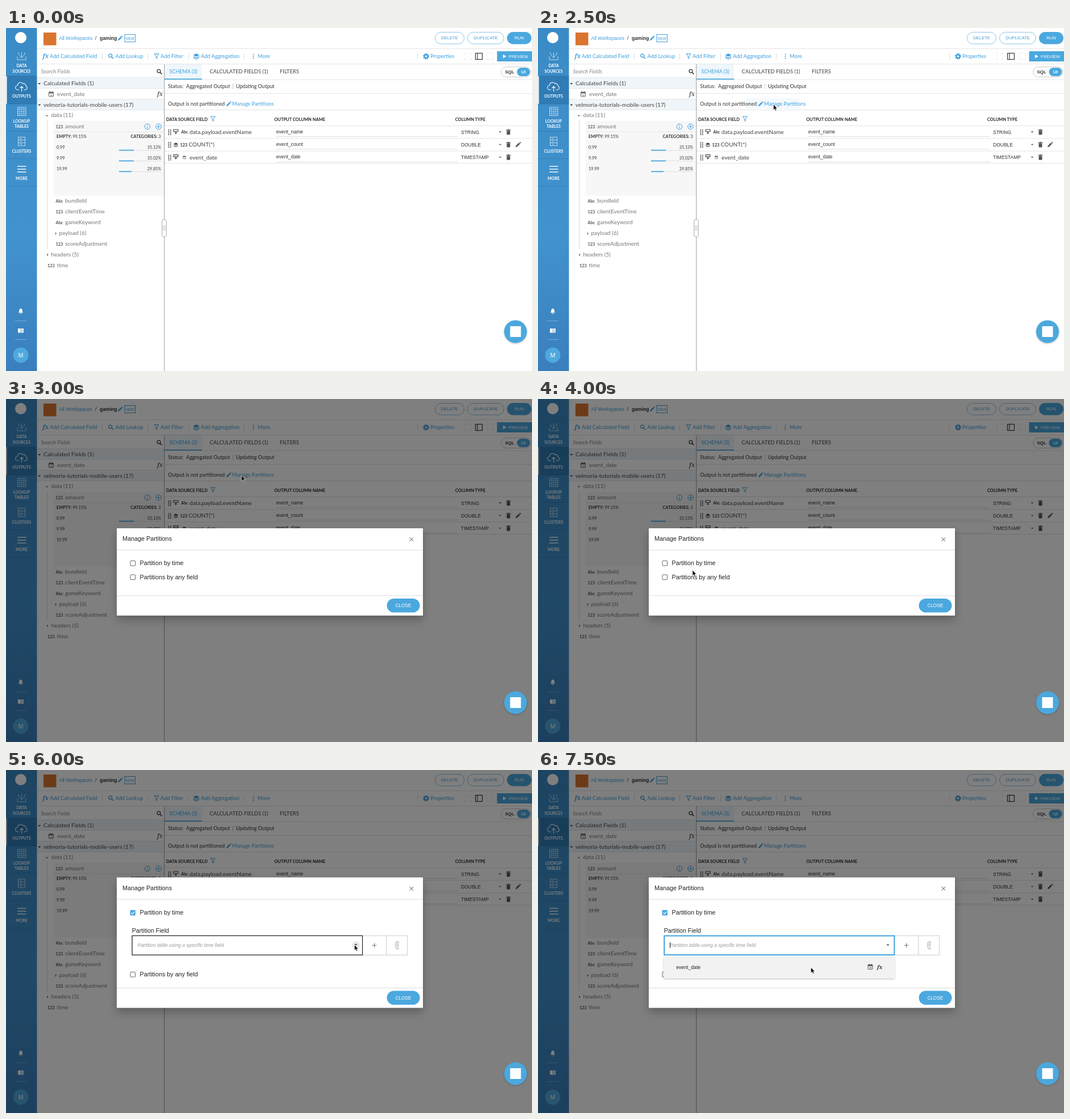
An HTML page for the animation above (8 s loop, 926 by 605 pixels).

```html
<!DOCTYPE html>
<html lang="en">
<head>
<meta charset="utf-8">
<title>Manage partitions</title>
<style>
html, body { margin: 0; width: 100%; height: 100%; overflow: hidden; background: #fff; }
svg { display: block; width: 100vw; height: 100vh; }
text { font-family: Lato, sans-serif; white-space: pre; }
.h { font-family: "Liberation Sans", Arial, sans-serif; }
.b { font-weight: 700; }
.i { font-style: italic; }
.m { text-anchor: middle; }
.e { text-anchor: end; }
.fx { font-family: "Noto Serif", "Liberation Serif", serif; font-style: italic; font-weight: 600; }
</style>
</head>
<body>
<svg id="stage" viewBox="0 0 926 605" xmlns="http://www.w3.org/2000/svg">
  <defs>
    <linearGradient id="navFill" x1="0" y1="0" x2="0" y2="1">
      <stop offset="0" stop-color="#3a8bc5"/>
      <stop offset=".6" stop-color="#4193cf"/>
      <stop offset="1" stop-color="#3a7fbd"/>
    </linearGradient>
    <filter id="modalShadow" x="-10%" y="-30%" width="120%" height="160%">
      <feDropShadow dx="0" dy="8" stdDeviation="8" flood-opacity=".25"/>
    </filter>
    <filter id="softShadow" x="-30%" y="-30%" width="160%" height="160%">
      <feDropShadow dx="0" dy="1" stdDeviation="1.8" flood-opacity=".3"/>
    </filter>
  </defs>
  <g id="page"></g>
  <rect id="dim" width="926" height="605" fill="#000"/>
  <g id="chat"></g>
  <g id="modal"></g>
  <path id="cursor" d="M0 0V9.6L2.2 7.6L3.7 11L5.3 10.3L3.8 7H6.8Z" fill="#000" stroke="#fff" stroke-width=".6"/>
</svg>
<script>
const BLUE = '#4ba8de', LINK = '#3f9fdc', DARK = '#333', GREY = '#777', PALE = '#e4e4e4';

const txt = (x, y, size, fill, str, cls = '') =>
  `<text x="${x}" y="${y}" font-size="${size}" fill="${fill}" class="${cls}">${str}</text>`;
const box = (x, y, w, h, fill, stroke = 'none', r = 0, sw = 1) =>
  `<rect x="${x}" y="${y}" width="${w}" height="${h}" rx="${r}" fill="${fill}" stroke="${stroke}" stroke-width="${sw}"/>`;
const path = (d, stroke, sw = 1, fill = 'none') =>
  `<path d="${d}" fill="${fill}" stroke="${stroke}" stroke-width="${sw}"/>`;
const fillPath = (d, fill) => `<path d="${d}" fill="${fill}"/>`;
const hline = (x1, x2, y, c = PALE, sw = 1) => path(`M${x1} ${y}H${x2}`, c, sw);
const dot = (x, y, r, fill, stroke = 'none') =>
  `<circle cx="${x}" cy="${y}" r="${r}" fill="${fill}" stroke="${stroke}"/>`;

const caretDown = (x, y, c = '#444', s = 2.6) => fillPath(`M${x - s} ${y - s / 2}h${2 * s}l${-s} ${s}z`, c);
const caretUp = (x, y, c = '#444', s = 2.6) => fillPath(`M${x - s} ${y + s / 2}h${2 * s}l${-s} ${-s}z`, c);
const caretRight = (x, y, c) => fillPath(`M${x - 1.3} ${y - 2.5}v5l2.6 -2.5z`, c);
const pencil = (x, y, c, k = 1) =>
  `<g transform="translate(${x} ${y}) scale(${k})">` +
  fillPath('M-4 4l.6 -2.4 4.8 -4.8 1.8 1.8 -4.8 4.8zM2 -3.8l.7 -.6q.5 -.3 .9 0l.9 .9q.4 .5 0 .9l-.7 .6z', c) + '</g>';
const trash = (x, y) => fillPath(`M${x - 3} ${y - 2.5}h6v6q0 1.2 -1.2 1.2h-3.6q-1.2 0 -1.2 -1.2zM${x - 4} ${y - 4.3}h2.3l.7 -.8h2l.7 .8h2.3v1.2h-8z`, '#555');
const funnel = (x, y) => path(`M${x - 4} ${y - 4}h8l-3 4v4.5l-2 -1.5v-3z`, LINK, 1);
const layers = (x, y, c, k = 1) =>
  `<g transform="translate(${x} ${y}) scale(${k})">` +
  fillPath('M0 -4.6L5.5 -1.8L0 1L-5.5 -1.8z', c) +
  path('M-5.3 .6L0 3.2L5.3 .6M-5.3 2.8L0 5.4L5.3 2.8', c, 1.1) + '</g>';
const calendar = (x, y, c, k = 1) =>
  `<g transform="translate(${x} ${y}) scale(${k})">` + box(-4, -3.5, 8, 8, 'none', c, 1) +
  box(-4, -3.5, 8, 2.4, c) + path('M-2.3 -5v2M2.3 -5v2', c) + txt(0, 3.4, 4, c, '14', 'b m') + '</g>';
const magnifier = (x, y, c) => `<circle cx="${x}" cy="${y}" r="2.9" fill="none" stroke="${c}" stroke-width="1.3"/>` +
  path(`M${x + 2} ${y + 2}l3.4 3.4`, c, 1.5);

function navBar() {
  const faint = 'rgba(255,255,255,.65)';
  let s = box(0, 0, 54.5, 605, 'url(#navFill)') + box(0, 85, 54.5, 49, 'rgba(0,50,100,.2)') + box(0, 85, 1.5, 49, '#fff');
  for (const y of [84.5, 134, 182, 230.5, 279]) s += hline(0, 54.5, y, 'rgba(20,70,120,.25)');
  s += dot(26, 17, 10, '#fff');
  s += path('M20 50v6h15v-6M27.5 43v9M25 50l2.5 2.5 2.5 -2.5M21.5 43q0 5 4 7M33.5 43q0 5 -4 7', faint);
  s += path('M23 109h-2a4 4 0 0 1 -.5 -8a5 5 0 0 1 9 -3a5 5 0 0 1 6 4.5a3.5 3.5 0 0 1 -1 6.5h-3M27.5 112v-9M24.5 106l3 -3 3 3', '#fff', 1.1);
  s += box(20.5, 140, 14.5, 14.5, 'none', faint) + path('M24 140v14.5M27.7 140v14.5M31.3 140v14.5M20.5 143.6h14.5M20.5 147.2h14.5M20.5 150.9h14.5', faint, .7);
  s += box(21.5, 192.5, 12, 15, 'none', faint) + path('M21.5 197.5h12M21.5 202.5h12M24 195h4M24 200h4M24 205h4', faint);
  for (const y of [244, 249, 254]) s += hline(20, 35.5, y, '#fff', 1.4);
  const labels = [['DATA', 69], ['SOURCES', 78.5], ['OUTPUTS', 122.5], ['LOOKUP', 166.5], ['TABLES', 176], ['CLUSTERS', 219.5], ['MORE', 268]];
  for (const [name, y] of labels) s += txt(27.5, y, 7.05, '#fff', name, 'b m');
  s += fillPath('M21.8 502.3q1.4 -1 1.4 -3.5q0 -3.3 2.8 -4q2.8 .7 2.8 4q0 2.5 1.4 3.5zM24.7 503.2h2.6q-.2 1.4 -1.3 1.4t-1.3 -1.4z', '#fff');
  s += hline(16, 36, 516.5, 'rgba(255,255,255,.3)') + hline(16, 36, 549.5, 'rgba(255,255,255,.3)');
  s += box(21, 530, 10, 7.5, '#fff', 'none', 1) + path('M26 530v7.5M27.3 532h2.6M27.3 533.8h2.6M27.3 535.6h2.6', '#3c87c2', .7);
  return s + dot(26, 577, 13.5, '#4fa9de') + txt(26, 580.8, 10.5, '#fff', 'M', 'h m');
}

function header() {
  let s = box(66, 8, 22.5, 22.5, '#d9752f');
  s += txt(93.5, 21, 8.5, LINK, 'All Workspaces', 'h') + txt(157, 21, 8.6, DARK, '/', 'h');
  s += txt(165, 21, 8.6, DARK, 'gaming', 'h b') + pencil(201, 18, LINK);
  s += box(209, 11.5, 18.5, 13, '#fff', LINK) + txt(218.3, 20.5, 6.4, LINK, 'NEW', 'h m');
  s += box(755.5, 7.5, 51, 20.5, '#fff', '#8cc5e9', 10.2) + txt(781, 20.4, 7.7, LINK, 'DELETE', 'h m');
  s += box(812.5, 7.5, 64, 20.5, '#fff', '#8cc5e9', 10.2) + txt(844.5, 20.4, 7.7, LINK, 'DUPLICATE', 'h m');
  s += box(882, 7, 43, 21.5, BLUE, 'none', 10.7) + txt(903.5, 20.4, 7.7, '#fff', 'RUN', 'h m');
  s += hline(55, 926, 36.5) + hline(55, 926, 63.5);

  s += txt(64.5, 53.3, 10.5, LINK, 'fx', 'fx');
  for (const [x, name] of [[77, 'Add Calculated Field'], [192.5, 'Add Lookup'], [272, 'Add Filter'], [343, 'Add Aggregation'], [443, 'More'], [747, 'Properties']])
    s += txt(x, 53.3, 9.25, LINK, name);
  for (const x of [169.5, 249.5, 321.5, 419.5, 724.5]) s += path(`M${x} 44.5v11`, '#ddd');
  s += magnifier(183.7, 48.7, LINK) + funnel(265, 49.5) + layers(335, 49.5, LINK);
  for (const y of [46.5, 50, 53.5]) s += dot(435.5, y, 1, LINK);
  s += `<circle cx="739.5" cy="50" r="4.6" fill="none" stroke="${LINK}" stroke-width="1.8" stroke-dasharray="2 1.61"/><circle cx="739.5" cy="50" r="2.9" fill="none" stroke="${LINK}" stroke-width="2.2"/>`;
  s += path('M807.5 47v-2.5h2.5M815.5 44.5h2.5v2.5M818 53v2.5h-2.5M810 55.5h-2.5v-2.5', PALE);
  s += box(826.5, 44.5, 12, 11, 'none', '#444', 0, 1.3) + path('M830 44.5v11', '#444', 1.2);
  s += box(846.5, 44.5, 11.5, 11, 'none', '#eee');
  return s + box(864.5, 41, 61.5, 18, BLUE) + fillPath('M875 46.7v6.6l6 -3.3z', '#fff') + txt(885, 52.8, 7.35, '#fff', 'PREVIEW', 'h');
}

function fieldTree() {
  let s = txt(61.5, 80.3, 9.5, '#888', 'Search Fields', 'i') + magnifier(269, 76, DARK);
  s += box(55, 88, 223.5, 18, '#f0f5f9') + box(55, 126, 223.5, 18, '#f0f5f9');
  for (const y of [87.5, 106.5, 125.5, 144.5]) s += hline(55, 278, y, '#e3e8ec');
  s += caretDown(58.8, 98.5, DARK) + txt(66, 101, 10.1, '#444', 'Calculated Fields (1)');
  s += calendar(79.5, 116.5, '#666') + txt(90, 119.5, 10.1, GREY, 'event_date') + txt(266, 119.5, 10, '#666', 'fx', 'fx');
  s += caretDown(58.8, 136, DARK) + txt(66, 138.5, 10.1, '#444', 'velmoria-tutorials-mobile-users (17)');
  s += path('M72.5 162V390', '#ddd') + caretDown(72, 155, GREY) + txt(79.5, 157.3, 10, GREY, 'data (11)');

  s += box(84, 164, 194.5, 132, '#f7f7f7') + hline(84, 278, 183, '#e6e6e6');
  s += txt(104, 177, 10, GREY, 'amount');
  s += dot(249, 174, 4.8, 'none', LINK) + path('M249 173v3.8M249 171v1.1', LINK);
  s += dot(268.5, 174, 4.8, 'none', LINK) + path('M265.7 174h5.6M268.5 171.2v5.6', LINK);
  s += txt(89, 194.2, 7.35, DARK, '<tspan class="b">EMPTY:</tspan> 99.15%');
  s += txt(272.7, 194.2, 7.45, DARK, '<tspan class="b">CATEGORIES:</tspan> 3', 'e');
  [['0.99', '35.13'], ['9.99', '35.02'], ['19.99', '29.85']].forEach(([name, pct], i) => {
    const y = 213 + i * 18.8;
    s += txt(89, y, 7.4, DARK, name) + txt(273, y, 7.2, DARK, pct + '%', 'e');
    s += hline(199, 273, y + 2.8, '#ddd') + hline(199, 199 + .74 * pct, y + 2.6, '#55ade0', 2);
  });

  const fields = [['123', '', 177], ['Abc', 'bundleId', 308], ['123', 'clientEventTime', 327], ['Abc', 'gameKeyword', 346], ['123', 'scoreAdjustment', 384]];
  for (const [kind, name, y] of fields) s += txt(87.5, y, 7.4, '#555', kind, 'b') + txt(104, y, 10, GREY, name);
  s += caretRight(88, 362.5, GREY) + txt(93.5, 365, 10, GREY, 'payload (6)');
  s += caretRight(73.5, 400, GREY) + txt(79.5, 402.7, 10, GREY, 'headers (5)');
  return s + txt(73, 421.5, 7.4, '#555', '123', 'b') + txt(89.5, 421.5, 10, GREY, 'time');
}

function schema() {
  let s = box(279, 64, 66, 26.5, '#eff7fc') + hline(279, 926, 91) + hline(279, 345, 90.2, BLUE, 1.8);
  s += txt(287.5, 80.3, 9, LINK, 'SCHEMA (3)') + txt(358.5, 80.3, 9.25, '#444', 'CALCULATED FIELDS (1)') + txt(482, 80.3, 9.4, '#444', 'FILTERS');
  s += box(871.5, 68.5, 52.5, 18, '#fff', '#ccc', 9) + box(899.5, 70, 23, 15, BLUE, 'none', 7.5);
  s += txt(878.5, 80.2, 7.9, DARK, 'SQL', 'h b') + txt(911, 80.2, 7.9, '#fff', 'UI', 'h b m');
  s += txt(285.3, 106, 9.1, DARK, 'Status:') + txt(317, 106, 9.1, DARK, 'Aggregated Output') + txt(404.7, 106, 9.1, DARK, 'Updating Output');
  s += path('M399.5 98v10', '#ccc') + hline(279, 926, 115.5) + hline(279, 926, 144.5);
  s += txt(285.3, 136.5, 9.1, DARK, 'Output is not partitioned') + pencil(392, 134, LINK) + txt(398, 137, 9.2, LINK, 'Manage Partitions');
  s += txt(282, 163.7, 7.5, '#222', 'DATA SOURCE FIELD', 'b') + funnel(364.3, 160);
  s += txt(472.3, 163.7, 7.5, '#222', 'OUTPUT COLUMN NAME', 'b') + txt(790.7, 163.7, 7.55, '#222', 'COLUMN TYPE', 'b');
  const rows = [['data.payload.eventName', 'event_name', 'STRING'], ['COUNT(*)', 'event_count', 'DOUBLE'], ['event_date', 'event_date', 'TIMESTAMP']];
  rows.forEach(([field, column, type], i) => {
    const y = 183.5 + i * 22.3;
    s += hline(279, 926, y - 11) + hline(475, 795, y + 8, '#ddd');
    for (let k = 0; k < 8; k++) s += box(285.5 + k % 2 * 3.4, y - 4.5 + (k >> 1) * 2.7, 1.8, 1.8, '#555');
    s += i === 1 ? layers(299, y, '#444', .75)
      : path(`M295 ${y - 4.5}h8v3.5h-8zM299 ${y - 1}v3M297.3 ${y + 1}l1.7 1.8 1.7 -1.8`, '#444', 1.1);
    s += i === 2 ? calendar(314, y, '#555', .6) : txt(i ? 306.5 : 308.5, y + (i ? 2.7 : 2.3), i ? 7.4 : 6.7, DARK, i ? '123' : 'Abc', 'b');
    s += txt(i === 1 ? 321.5 : 323, y + 3.5, 10.1, '#444', field);
    s += txt(475.8, y + 2.2, 8.6, DARK, column, 'h') + txt(801, y + 3.2, 8.5, DARK, type, 'h');
    s += caretDown(870, y, '#555', 2.3) + trash(884.5, y);
  });
  s += pencil(901.5, 205.8, '#555', 1.1) + hline(279, 926, 238.5);
  return s + path('M278.8 64V605', '#999') + box(274.7, 337.5, 7.6, 31, '#fff', '#aaa', 3.5) +
    path('M277 348v10M279.8 348v10', '#bbb', 1, 'none');
}

function checkbox(y, label, on) {
  const mark = on ? box(218.5, y - 4.7, 9.4, 9.4, BLUE, 'none', 1) + path(`M220.6 ${y}l2 2.1 3.6 -4`, '#fff', 1.2)
    : box(219, y - 4.3, 8.6, 8.6, '#fff', '#666', .8);
  return mark + txt(235.5, y + 3.5, 10.75, '#222', label, 'h');
}

function timeField({ hover, focus, caret, itemHover }) {
  let s = txt(221.7, 286.5, 10.7, '#222', 'Partition Field', 'h');
  s += box(222, 292.3, 484.5, 34, '#fff', '#ccc') + path('M627.5 292.3v34M669.5 292.3v34', '#ccc');
  if (hover) s += box(222, 292.3, 405.5, 34, 'none', '#222', 0, 1.2);
  if (focus) s += box(222.3, 292.5, 405, 33.6, 'none', '#3ba0db', 0, 1.9);
  s += txt(231.7, 312, 8.68, '#999', 'Partition table using a specific time field', 'h i');
  if (caret) s += path('M232.5 304v10', '#222');
  if (hover) s += dot(616, 309, 7, '#e8e8e8');
  s += focus ? caretUp(616, 308, '#444') : caretDown(616, 308.3, '#444');
  s += path('M644.5 309.3h8M648.5 305.3v8', '#777', 1.1);
  s += path('M685.5 304v8.5q0 2 2 2h1M685.5 309h3M685.5 304h3', '#bbb') + box(688, 302.5, 3, 3, 'none', '#bbb') + box(688, 307.5, 3, 3, 'none', '#bbb') + box(688, 313, 3, 3, 'none', '#bbb');
  s += checkbox(360.7, 'Partitions by any field');
  if (focus) {
    s += `<g filter="url(#softShadow)">${box(221.5, 329.5, 406, 38, itemHover ? '#f2f2f2' : '#fff')}</g>`;
    s += txt(243.2, 351, 8.7, '#222', 'event_date', 'h') + calendar(585, 347, '#555') + txt(597, 351, 9.5, DARK, 'fx', 'fx');
  }
  return s;
}

function modal(state) {
  const { open } = state, top = open ? 189.5 : 228, h = open ? 230 : 154, foot = top + h - 35.2;
  let s = `<g filter="url(#modalShadow)">${box(195, top, 539, h, '#fff')}</g>`;
  s += txt(205, top + 22.3, 10.8, '#222', 'Manage Partitions', 'h');
  s += path(`M710.5 ${top + 16.3}l6.6 6.6m0 -6.6l-6.6 6.6`, '#888', 1.1);
  s += hline(195, 734, top + 38.7, '#ddd') + hline(195, 734, foot, '#ddd');
  s += box(670.5, foot + 5.2, 58, 24.6, BLUE, 'none', 12.3) + txt(699.3, foot + 20.3, 8.2, '#fff', 'CLOSE', 'h m');
  s += checkbox(open ? 251.7 : 289.7, 'Partition by time', open);
  return s + (open ? timeField(state) : checkbox(314.3, 'Partitions by any field'));
}

// Pointer stops: time, x, y
const STOPS = [
  [500, 608, 123], [750, 536, 177], [1000, 417, 228], [1250, 384, 165], [1500, 410, 134], [1750, 414.5, 135],
  [3250, 363, 143], [3500, 353, 292], [3750, 285, 321], [4000, 272, 302], [4250, 274.5, 290.3],
  [5500, 628, 308], [5750, 662, 308], [6000, 613.5, 308.5], [7000, 480.5, 348.3]
];
const LOOP = 8000, STEP = 250;
const $ = id => document.getElementById(id);

$('page').innerHTML = box(0, 0, 926, 605, '#fff') + navBar() + header() + fieldTree() + schema() +
  `<rect id="ripple" x="367" y="124" width="94" height="19" fill="${LINK}" opacity=".06"/>`;
$('chat').innerHTML = `<g filter="url(#softShadow)">${dot(897, 535.5, 20, BLUE)}</g>` + box(887.5, 526, 19, 19, '#fff');

function render(t) {
  const stop = STOPS.filter(p => p[0] <= t).pop();
  $('cursor').setAttribute('visibility', stop ? 'visible' : 'hidden');
  if (stop) $('cursor').setAttribute('transform', `translate(${stop[1]} ${stop[2]})`);
  $('ripple').setAttribute('visibility', t >= 2500 && t < 3000 ? 'visible' : 'hidden');

  const fading = t < 3000;
  $('dim').setAttribute('opacity', t < 2750 ? 0 : fading ? .11 : .5);
  $('modal').setAttribute('opacity', fading ? .2 : 1);
  $('modal').innerHTML = t < 2750 ? '' : modal({
    open: t >= 4500,
    hover: (t >= 5500 && t < 5750) || (t >= 6000 && t < 6500),
    focus: t >= 6500,
    caret: t >= 6500 && t % 1000 >= 500,
    itemHover: t >= 7000
  });
}

let shown = -1;
const start = performance.now();
function tick() {
  const t = Math.floor((performance.now() - start) % LOOP / STEP) * STEP;
  if (t !== shown) render(shown = t);
  requestAnimationFrame(tick);
}
tick();
</script>
</body>
</html>
```
